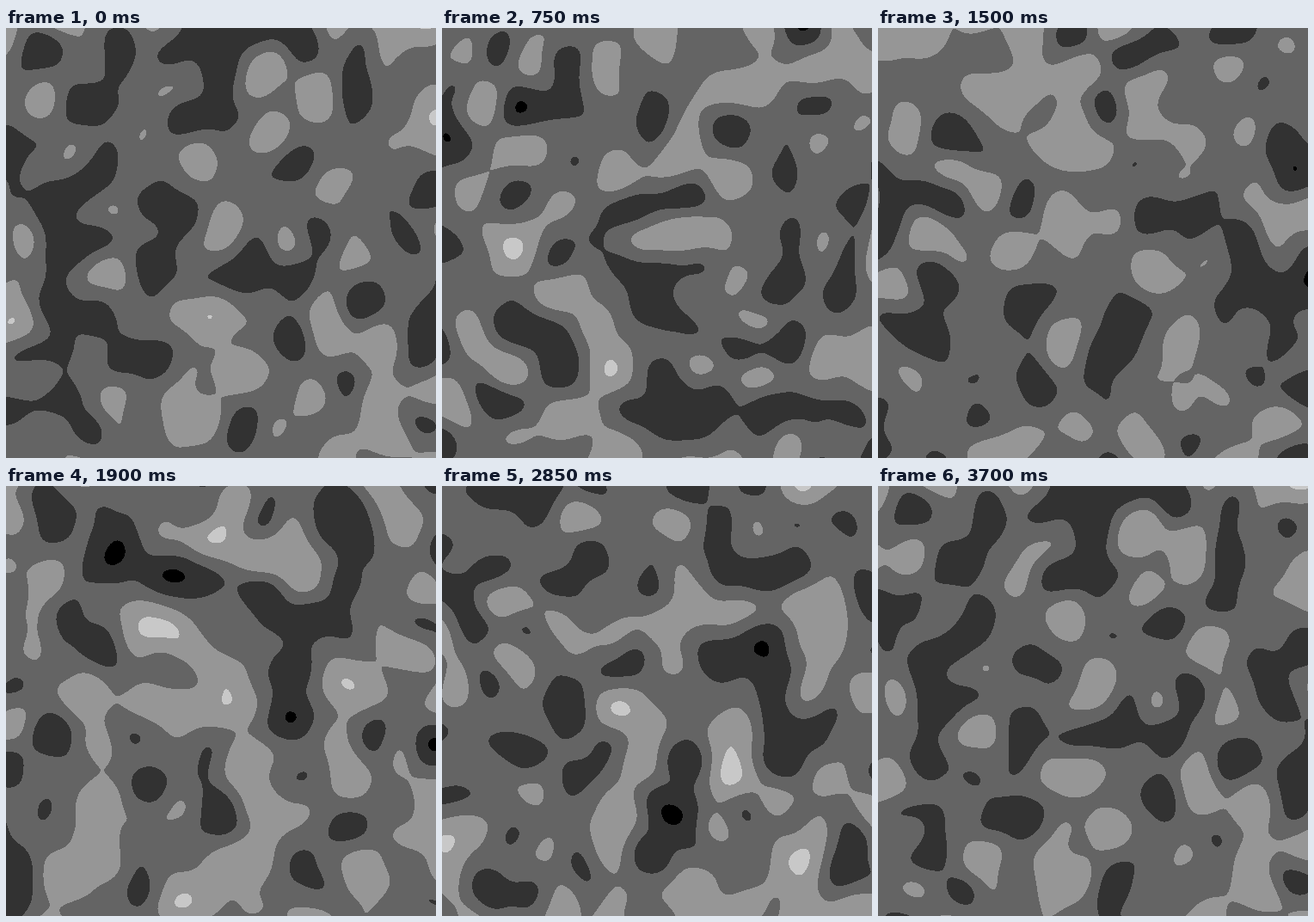
Write an HTML page with a canvas that moves like this. It is 500 px wide and 500 px high and loops after 3.75 s.

```html
<!DOCTYPE html>
<html lang="en">
<head>
<meta charset="utf-8">
<title>Looping noise</title>
<style>
  html, body { margin: 0; height: 100%; overflow: hidden; background: #646464; }
  canvas { display: block; }
</style>
</head>
<body>
<canvas id="stage" width="500" height="500"></canvas>
<script>
const SIZE = 500, STEPS = 75, STEP_MS = 50;
const SCALE = 0.02, RADIUS = 1.5, SEED = 0n;
const GREY_STEP = 50;
const SQUISH = (Math.sqrt(5) - 1) / 4;

const ctx = document.getElementById('stage').getContext('2d');
const image = ctx.createImageData(SIZE, SIZE);
const pixels = new Uint32Array(image.data.buffer);
const field = new Float32Array(SIZE * SIZE);

// Permutation table shuffled by a 64-bit linear congruential generator
function shuffledTable(seed) {
  const next = () => seed = BigInt.asIntN(64, seed * 6364136223846793005n + 1442695040888963407n);
  const source = Array.from({ length: 256 }, (_, i) => i);
  const table = [];
  for (let i = 0; i < 3; i++) next();
  for (let i = 255; i >= 0; i--) {
    const n = i + 1;
    const r = (Number((next() + 31n) % BigInt(n)) + n) % n;
    table[i] = source[r];
    source[r] = source[i];
  }
  return table;
}

// Lattice points of 4D OpenSimplex noise that can reach the stage, with their gradients
function buildLattice() {
  const perm = shuffledTable(SEED);
  const reach = Math.SQRT2, span = SIZE * SCALE + reach, depth = RADIUS + reach;
  const points = [];
  for (let i = -8; i < 16; i++)
    for (let j = -8; j < 16; j++)
      for (let k = -9; k < 7; k++)
        for (let l = -9; l < 7; l++) {
          const cell = [i, j, k, l];
          const shift = (i + j + k + l) * SQUISH;
          const [x, y, z, w] = cell.map(c => c + shift);
          if (x < -reach || x > span || y < -reach || y > span || Math.hypot(z, w) > depth) continue;
          const hash = cell.reduce((h, c) => perm[(h + c) & 255], 0) >> 2;
          const grad = cell.map((_, a) => (a === (hash & 3) ? 3 : 1) * (hash >> (a + 2) & 1 ? -1 : 1));
          points.push({ x, y, z, w, grad });
        }
  return points;
}

const lattice = buildLattice();

// Adds one point's kernel to the slice at depth (z, w)
function splat({ x, y, z, w, grad: [gx, gy, gz, gw] }, sliceZ, sliceW) {
  const dz = sliceZ - z, dw = sliceW - w;
  const room = 2 - dz * dz - dw * dw;
  if (room <= 0) return;
  const base = gz * dz + gw * dw;
  const r = Math.sqrt(room);
  const top = Math.max(0, Math.ceil((y - r) / SCALE));
  const bottom = Math.min(SIZE - 1, Math.floor((y + r) / SCALE));
  for (let py = top; py <= bottom; py++) {
    const dy = py * SCALE - y;
    const rowRoom = room - dy * dy;
    if (rowRoom <= 0) continue;
    const half = Math.sqrt(rowRoom), rowBase = base + gy * dy;
    const left = Math.max(0, Math.ceil((x - half) / SCALE));
    const right = Math.min(SIZE - 1, Math.floor((x + half) / SCALE));
    for (let px = left; px <= right; px++) {
      const dx = px * SCALE - x;
      const a = (rowRoom - dx * dx) ** 2;
      field[py * SIZE + px] += a * a * (rowBase + gx * dx);
    }
  }
}

function draw(step) {
  const angle = 2 * Math.PI * (step + 1) / STEPS;
  const z = RADIUS * Math.cos(angle), w = RADIUS * Math.sin(angle);
  field.fill(0);
  for (const point of lattice) splat(point, z, w);
  for (let p = 0; p < pixels.length; p++) {
    const brightness = (field[p] / 30 + 1) * 127.5;
    const grey = Math.floor(brightness / GREY_STEP) * GREY_STEP;
    pixels[p] = 0xff000000 | grey * 0x010101;
  }
  ctx.putImageData(image, 0, 0);
}

let shown = -1;
function tick() {
  const step = Math.floor(performance.now() / STEP_MS) % STEPS;
  if (step !== shown) draw(shown = step);
  requestAnimationFrame(tick);
}
tick();
</script>
</body>
</html>
```
